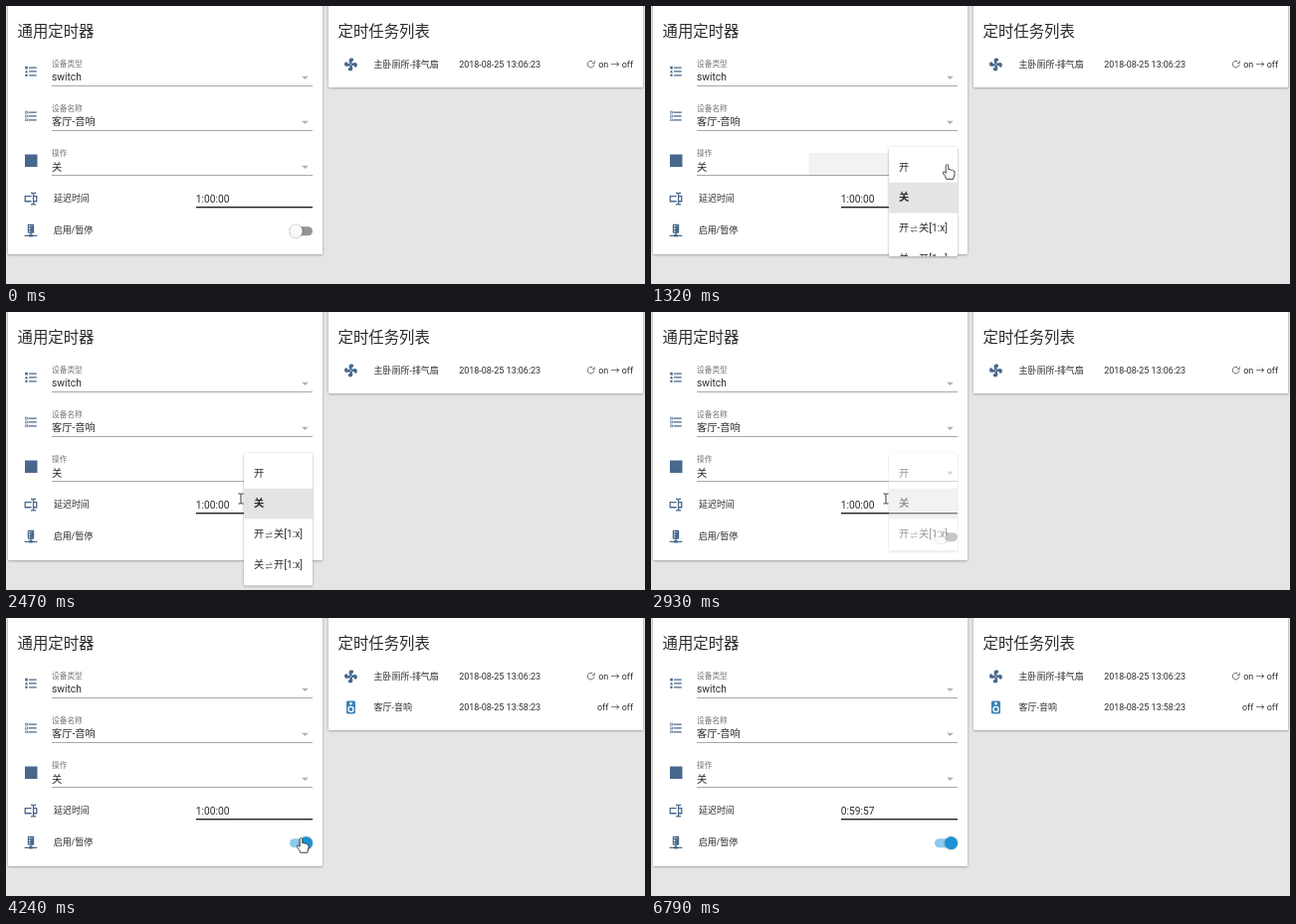
Animation, 642 px wide and 280 px high, one loop 7.17 s. Source, as an HTML page:

```html
<!DOCTYPE html>
<html lang="zh-CN">
<head>
<meta charset="utf-8">
<title>通用定时器</title>
<style>
html, body { margin: 0; width: 100%; height: 100%; overflow: hidden; background: #e5e5e5; }
svg { display: block; width: 642px; height: 280px; }
text { font-family: Roboto, "Noto Sans CJK SC", "Noto Sans CJK", "DejaVu Sans", sans-serif; font-size: 10.24px; fill: #2b2b2b; white-space: pre; }
.title { font-size: 15.4px; font-weight: 300; }
.label { font-size: 7.7px; fill: #737373; }
.row { font-size: 8.96px; }
.end { text-anchor: end; }
.swap { font-size: 7.4px; }
.card { fill: #fff; filter: drop-shadow(0 1.2px .8px rgba(0,0,0,.22)) drop-shadow(0 .6px 1.2px rgba(0,0,0,.14)); }
.icon { fill: #47688c; }
.line { fill: #a8a8a8; }
.pointer { fill: #fff; stroke: #2b2b2b; stroke-width: .9; stroke-linejoin: round; }
</style>
</head>
<body>
<svg viewBox="0 0 642 280">
  <defs>
    <clipPath id="menuClip"><rect id="menuWindow" x="239" y="142" width="69" height="133.5"/></clipPath>
    <clipPath id="fieldClip"><rect x="46" y="148" width="262" height="23"/></clipPath>
    <path id="blade" d="M12.5 2C17 2 17.1 5.6 14.75 6.75C13.8 7.2 13.3 8.3 13.1 9.2L12 12L10.1 9.65C8.15 5.96 8.94 2 12.5 2Z"/>
    <path id="caret" d="M-3.3 0H3.3L0 3.3Z" fill="#b0b0b0"/>
  </defs>

  <rect class="card" x="2" y="-6" width="316" height="256" rx="1.3"/>
  <rect class="card" id="listCard" x="324" y="-6" width="316" height="88" rx="1.3"/>
  <text class="title" x="11.5" y="31.1">通用定时器</text>
  <text class="title" x="333.5" y="31.1">定时任务列表</text>

  <g class="icon">
    <path transform="translate(17.3 58.3) scale(.64)" d="M5 9.5L7.5 14H2.5ZM3 4H7V8H3ZM5 20A2 2 0 0 0 5 16A2 2 0 0 0 5 20M9 5V7H21V5ZM9 19H21V17H9ZM9 13H21V11H9Z"/>
    <path transform="translate(17.3 103.3) scale(.64)" fill-rule="evenodd" d="M8 5H21V7H8ZM8 11H21V13H8ZM8 17H21V19H8ZM3 4H7V8H3ZM4 5V7H6V5ZM3 10H7V14H3ZM4 11V13H6V11ZM3 16H7V20H3ZM4 17V19H6V17Z"/>
    <rect x="19" y="149.5" width="12.5" height="12.5"/>
    <path transform="translate(17.3 186.5) scale(.64)" d="M17 7H22V17H17V19A1 1 0 0 0 18 20H20V22H17.5C17 22 16 21.5 16 21C16 21.5 15 22 14.5 22H12V20H14A1 1 0 0 0 15 19V5A1 1 0 0 0 14 4H12V2H14.5C15 2 16 2.5 16 3C16 2.5 17 2 17.5 2H20V4H18A1 1 0 0 0 17 5ZM2 7H13V9H4V15H13V17H2ZM20 15V9H17V15Z"/>
    <path transform="translate(17.3 218.5) scale(.64)" fill-rule="evenodd" d="M13 18H14A1 1 0 0 1 15 19H22V21H15A1 1 0 0 1 14 22H10A1 1 0 0 1 9 21H2V19H9A1 1 0 0 1 10 18H11V16H8A1 1 0 0 1 7 15V3A1 1 0 0 1 8 2H16A1 1 0 0 1 17 3V15A1 1 0 0 1 16 16H13ZM13 4V6H14V4ZM9 4V6H11V4ZM9 8V10H11V8ZM9 12V14H11V12Z"/>
    <g transform="translate(338.8 51.3) scale(.64)">
      <use href="#blade"/>
      <use href="#blade" transform="rotate(90 12 12)"/>
      <use href="#blade" transform="rotate(180 12 12)"/>
      <use href="#blade" transform="rotate(270 12 12)"/>
      <circle cx="12" cy="12" r="3"/>
      <circle cx="12" cy="12" r="1" fill="#fff"/>
    </g>
  </g>

  <text class="label" x="46" y="61">设备类型</text>
  <text x="46" y="75.4">switch</text>
  <text class="label" x="46" y="106">设备名称</text>
  <text x="46" y="120.4">客厅-音响</text>
  <text class="label" id="actionLabel" x="46" y="151">操作</text>
  <text x="46" y="165.6">关</text>
  <g class="line">
    <rect x="46" y="80" width="262" height="1"/>
    <rect x="46" y="125" width="262" height="1"/>
    <rect x="46" y="170" width="262" height="1"/>
  </g>
  <use href="#caret" x="300.5" y="70.7"/>
  <use href="#caret" x="300.5" y="115.7"/>
  <use href="#caret" x="300.5" y="160.7"/>
  <rect id="focusLine" y="169.8" height="1.4" fill="#03a9f4"/>
  <g clip-path="url(#fieldClip)"><circle id="fieldRipple" cx="297.5" cy="159.5" fill="#212121"/></g>

  <text class="row" x="48" y="197.4">延迟时间</text>
  <text id="timer" x="190.8" y="198">1:00:00</text>
  <rect x="191" y="202" width="117" height="1.4" fill="#212121"/>
  <text class="row" x="47.7" y="229.4">启用/暂停</text>
  <rect id="bar" x="285" y="222.2" width="23" height="9" rx="4.5"/>
  <circle id="knobRipple" cy="226.7" r="15" fill="#1b93d6"/>
  <circle id="knob" cy="226.7" r="6.4" style="filter:drop-shadow(0 .6px 1px rgba(0,0,0,.4))"/>

  <text class="row" x="369.6" y="62.2">主卧厕所-排气扇</text>
  <text class="row" x="455.2" y="62.2">2018-08-25 13:06:23</text>
  <path d="M589.3 55.8A3.3 3.3 0 1 0 590.9 59M591.3 55.2V57.6H588.9" fill="none" stroke="#444" stroke-width=".8"/>
  <text class="row end" x="630" y="62.2">on → off</text>
  <g id="newTask">
    <path fill="#3d82b4" fill-rule="evenodd" transform="translate(338.8 82.3) scale(.64)" d="M7 2H17A2 2 0 0 1 19 4V20A2 2 0 0 1 17 22H7A2 2 0 0 1 5 20V4A2 2 0 0 1 7 2ZM12 4A2 2 0 0 0 12 8A2 2 0 0 0 12 4ZM12 10A5 5 0 0 0 12 20A5 5 0 0 0 12 10ZM12 12A3 3 0 0 1 12 18A3 3 0 0 1 12 12Z"/>
    <text class="row" x="369.6" y="93.2">客厅-音响</text>
    <text class="row" x="455.2" y="93.2">2018-08-25 13:58:23</text>
    <text class="row end" x="630" y="93.2">off → off</text>
  </g>

  <g id="menu">
    <rect class="card" id="menuBox" x="239" y="142" width="69" height="133.5" rx="1.3"/>
    <g clip-path="url(#menuClip)">
      <rect x="239" y="177.8" width="69" height="30.7" fill="#e4e4e4"/>
      <text x="249" y="165.6">开</text>
      <text x="249" y="196.4" font-weight="bold">关</text>
      <text y="227.3"><tspan x="249">开</tspan><tspan class="swap" x="260.6">⇌</tspan><tspan x="269">关[1:x]</tspan></text>
      <text y="258.3"><tspan x="249">关</tspan><tspan class="swap" x="260.6">⇌</tspan><tspan x="269">开[1:x]</tspan></text>
    </g>
  </g>

  <g id="cursor">
    <path class="pointer" id="arrow" d="M0 0V11L2.6 8.6L4.4 12.6L6.1 11.8L4.4 8H8Z"/>
    <path class="pointer" id="hand" transform="translate(.5 -.7)" d="M-1.3 1.2Q0 -.8 1.3 1.2V5.5Q2.8 4.6 3.8 6Q5 5.2 5.9 6.6Q7.3 6.2 7.5 7.8V10.5L6.2 15H-.8Q-1.6 12 -4 9.3Q-4.6 7.4 -2.7 7.8L-1.3 9Z"/>
    <path id="beam" fill="none" stroke="#333" d="M-2.5 -5H-.8L0 -4.3L.8 -5H2.5M0 -4.5V4.5M-2.5 5H-.8L0 4.3L.8 5H2.5"/>
  </g>
</svg>
<script>
const LOOP = 7170;
const el = {};
document.querySelectorAll('[id]').forEach(n => { el[n.id] = n; });

// Pointer stops: time, x, y
const path = [
  [150, 551, 267], [310, 455, 236], [460, 365, 212], [610, 288, 190], [690, 273, 178],
  [770, 286, 166], [840, 297, 160], [1620, 297, 160], [1850, 290, 215], [2000, 283, 236],
  [2200, 262, 213], [2310, 253, 192], [2400, 243, 188], [2470, 236, 188], [3090, 236, 188],
  [3300, 258, 206], [3450, 285, 221], [3600, 296, 222], [4500, 296, 222], [4720, 340, 228],
  [5000, 425, 236], [5240, 483, 242], [5400, 517, 252], [5860, 574, 279]
];

const set = (node, attrs) => { for (const k in attrs) node.setAttribute(k, attrs[k]); };
const show = (node, on) => set(node, { visibility: on ? 'visible' : 'hidden' });
const ramp = (t, a, b) => Math.min(1, Math.max(0, (t - a) / (b - a)));
const ease = p => 1 - (1 - p) ** 3;
const inside = (x, y, l, t, r, b) => x >= l && x <= r && y >= t && y <= b;

function pointerAt(t) {
  const i = Math.max(1, path.findIndex(p => p[0] >= t));
  const [t0, x0, y0] = path[i - 1], [t1, x1, y1] = path[i];
  const p = ramp(t, t0, t1);
  return [x0 + (x1 - x0) * p, y0 + (y1 - y0) * p];
}

function pointerKind(x, y, menuOpen) {
  if (menuOpen && inside(x, y, 239, 142, 308, 275)) return 'hand';
  if (inside(x, y, 46, 148, 308, 172) || inside(x, y, 285, 220, 308, 233)) return 'hand';
  return inside(x, y, 191, 186, 308, 204) ? 'beam' : 'arrow';
}

function drawPointer(t, menuOpen) {
  const visible = t >= 150 && t < 5860;
  set(el.cursor, { display: visible ? 'inline' : 'none' });
  if (!visible) return;
  const [x, y] = pointerAt(t);
  const kind = pointerKind(x, y, menuOpen);
  set(el.cursor, { transform: `translate(${x} ${y})` });
  for (const k of ['arrow', 'hand', 'beam']) show(el[k], k === kind);
}

function drawMenu(t) {
  const closing = ramp(t, 2800, 3050);
  const w = 69 * (0.5 + 0.5 * ease(ramp(t, 1200, 1340)));
  const h = 133.5 * (0.25 + 0.75 * ease(ramp(t, 1240, 1450))) * (1 - 0.5 * closing);
  const box = { x: 308 - w, width: w, height: h };
  set(el.menuBox, box);
  set(el.menuWindow, box);
  set(el.menu, {
    display: t >= 1200 && closing < 1 ? 'inline' : 'none',
    opacity: ramp(t, 1180, 1300) * (1 - closing)
  });
}

function drawField(t) {
  const spread = ramp(t, 1070, 1380);
  set(el.fieldRipple, {
    r: 4.5 * ramp(t, 920, 1050) + 166 * spread,
    opacity: t >= 920 ? 0.3 * (1 - spread) : 0
  });
  const focused = t >= 3050 && t < 3960;
  el.actionLabel.style.fill = focused ? '#03a9f4' : '';
  const w = focused ? 262 * ease(ramp(t, 3070, 3320)) : 0;
  set(el.focusLine, { x: 177 - w / 2, width: w });
}

function drawToggle(t) {
  const on = t >= 4000;
  const cx = 291.4 + 10.2 * ramp(t, 4000, 4080);
  set(el.bar, { fill: on ? '#8dc9ea' : '#959595' });
  set(el.knob, { cx, fill: on ? '#1b93d6' : '#fafafa' });
  set(el.knobRipple, { cx, opacity: t >= 3930 ? 0.2 * (1 - ramp(t, 3990, 4240)) : 0 });
}

function draw(t) {
  drawMenu(t);
  drawField(t);
  drawToggle(t);
  drawPointer(t, t >= 1200 && t < 3050);

  const added = t >= 4160;
  show(el.newTask, added);
  set(el.listCard, { height: added ? 119 : 88 });
  const left = t < 4790 ? 3600 : 3599 - Math.floor((t - 4790) / 1000);
  const pad = n => String(n).padStart(2, '0');
  el.timer.textContent = `${Math.floor(left / 3600)}:${pad(Math.floor(left / 60) % 60)}:${pad(left % 60)}`;
}

const start = performance.now();
function tick() {
  draw((performance.now() - start) % LOOP);
  requestAnimationFrame(tick);
}
tick();
</script>
</body>
</html>
```
